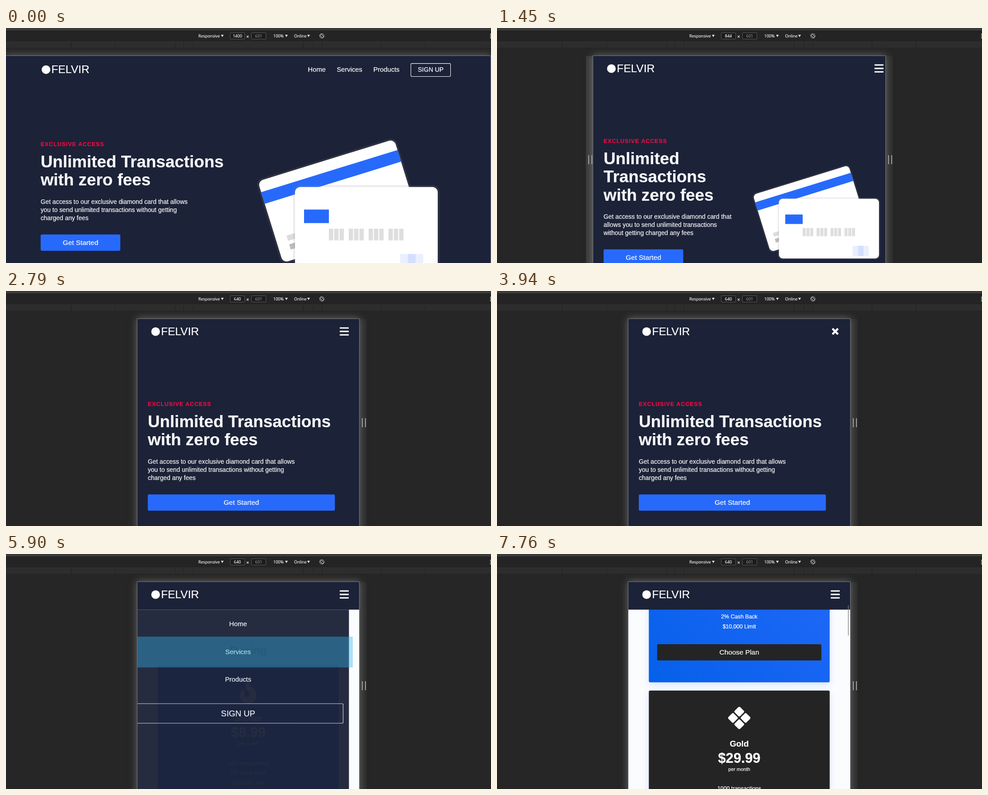
Write an HTML page that moves like this. It is 1074 by 521 pixels and loops after 8 s.

```html
<!DOCTYPE html>
<html lang="en">
<head>
<meta charset="utf-8">
<title>Responsive preview</title>
<style>
  * { box-sizing: border-box; margin: 0; padding: 0; }
  html, body { width: 100%; height: 100%; overflow: hidden; background: #262626; }
  #stage { position: relative; width: 1074px; height: 521px; overflow: hidden; background: #262626; font-family: "Liberation Sans", Arial, sans-serif; }
  #stage div, #stage svg, #stage nav { position: absolute; }

  /* Toolbar and ruler */
  #toolbar { inset: 0 0 auto; height: 31px; background: #242424; border-top: 4px solid #3a3a3a; border-bottom: 1px solid #333; font: 9px "Open Sans", "Noto Sans", sans-serif; color: #fff; -webkit-text-stroke: .15px; }
  #toolbar div { top: 14px; line-height: 14px; margin-top: -7px; white-space: nowrap; }
  #toolbar .line { inset: 0 0 auto; height: 1px; margin: 0; background: #474747; }
  #toolbar .field { top: 13px; width: 33px; height: 15px; border: 1px solid #5a5a5a; border-radius: 2px; background: #1c1c1c; text-align: center; line-height: 14px; }
  #toolbar .arrow { width: 6px; height: 5px; margin-top: -3px; background: #eee; clip-path: polygon(0 0, 100% 0, 50% 100%); }
  #ruler { inset: 31px 0 auto; height: 14px; background: #2d2d2d; border-bottom: 1px solid #222; }
  #ruler div { top: 0; width: 1px; height: 13px; background: #1f1f1f; }

  /* Device frame */
  #glow, #frame { top: 61px; height: 470px; }
  #glow { box-shadow: 0 0 16px #6a6a6a; }
  #frame { border: 1px solid #74777f; }
  .grip { top: 62px; width: 15px; height: 470px; background: rgba(255,255,255,.03); }
  .grip::after { content: ""; position: absolute; left: 5px; top: 220px; width: 5px; height: 20px; border: solid #a0a0a0; border-width: 0 2px; }
  #gripL { background: rgba(255,255,255,.09); }
  #thumb { left: 777px; width: 2px; height: 67px; border-radius: 1px; background: rgba(130,130,130,.7); }

  /* Page, in its own pixels */
  #page { top: 61.5px; height: 601px; overflow: hidden; transform-origin: 0 0; background: #1c2237; color: #f7f8fa; -webkit-text-stroke: .3px; }
  nav { inset: 0 0 auto; height: 80px; background: #1c2237; }
  #logo { display: flex; align-items: center; height: 36px; font-size: 32px; color: #fff; }
  #logo i { width: 25px; height: 25px; margin-right: 3px; border-radius: 50%; background: #fff; }
  #links { display: flex; align-items: center; gap: 32px; top: 0; height: 80px; font-size: 19.2px; white-space: nowrap; color: #fff; }
  #links span { margin-top: -3px; }
  #links b, #menu b { font-weight: 400; text-align: center; border-radius: 4px; box-shadow: inset 0 0 0 1.4px #fff; }
  #links b { width: 116px; height: 39px; line-height: 38px; font-size: 18px; }
  #icon { top: 21px; width: 30px; height: 30px; overflow: visible; stroke: #fff; fill: none; }
  #copy p:first-child { font: bold 16px/16px "Liberation Sans", Arial, sans-serif; letter-spacing: 1.4px; color: #f00946; margin-bottom: 16px; }
  #copy h1 { font-size: 48px; line-height: 52.4px; margin-bottom: 24px; }
  #copy p { max-width: 440px; font-size: 18px; line-height: 24px; margin-bottom: 35px; }
  .btn { height: 47px; line-height: 47px; font-size: 20px; text-align: center; border-radius: 4px; color: #fff; }
  #copy .btn { width: 230px; background: #276afb; }

  #shop { inset: 0; background: #fbfcfe; }
  #list { inset: 0; }
  #list .t { left: 0; right: 0; text-align: center; line-height: 1; transform: translateY(-50%); white-space: nowrap; }
  .card { left: 59px; width: 522px; height: 500px; border-radius: 4px; color: #fff; box-shadow: 0 6px 20px rgba(56,125,255,.2); }
  .card .btn { left: 24px; right: 24px; top: 390px; background: #242424; }
  .card svg { left: 229px; top: 47px; width: 64px; height: 64px; fill: #fff; }

  #menu { top: 80px; left: 0; width: 640px; height: 541px; background: #1c2237; font-size: 19.2px; text-align: center; }
  #menu span, #menu b { position: absolute; left: 16px; right: 16px; }
  #menu span { line-height: 24px; }
  #menu b { top: 271px; height: 58px; line-height: 57px; font-size: 24px; }
  #tap { left: -11px; top: 158px; width: 662px; height: 89px; background: rgba(51,181,229,.4); }
</style>
</head>
<body>
<div id="stage">
  <div id="toolbar">
    <div class="line"></div>
    <div style="left:426px">Responsive</div>
    <div class="field" style="left:496px" id="size"></div>
    <div style="left:532px;top:15px;font-size:11px">×</div>
    <div class="field" style="left:543px;color:#8c8c8c">601</div>
    <div style="left:592px">100%</div>
    <div style="left:638px">Online</div>
    <svg style="left:693px;top:7px" width="13" height="13" viewBox="-6.5 -6.5 13 13" fill="none" stroke="#ccc">
      <circle r="4.8"/><rect x="-2" y="-4.6" width="4" height="9.2" rx="1" transform="rotate(-45)"/>
    </svg>
    <div style="left:1072px;top:13px;margin:-4px 0 0;width:2px;height:10px;background:repeating-linear-gradient(#ccc 0 2px,transparent 2px 4px)"></div>
  </div>
  <div id="ruler"></div>
  <div id="glow"></div>
  <div class="grip" id="gripL"></div>
  <div class="grip" id="gripR"></div>

  <div id="page">
    <div id="copy">
      <p>EXCLUSIVE ACCESS</p>
      <h1>Unlimited Transactions with zero fees</h1>
      <p>Get access to our exclusive diamond card that allows you to send unlimited transactions without getting charged any fees</p>
      <section class="btn">Get Started</section>
    </div>
    <svg id="art" viewBox="537 235 440 320">
      <g transform="translate(557.6 338.1) rotate(-17.2)">
        <rect x="-4" y="-4" width="324" height="197" rx="15" fill="#808080" opacity=".16"/>
        <rect width="316" height="189" rx="12" fill="#fff"/>
        <path d="M0 25h316v27H0z" fill="#276afb"/>
        <path d="M25 134h150v12H25z" fill="#dcdcdc"/>
        <path d="M25 154h150v12H25z" fill="#bcbcbe"/>
      </g>
      <rect x="636" y="346.500" width="324" height="197" rx="15" fill="#808080" opacity=".16"/>
      <rect x="640" y="350.500" width="316" height="189" rx="12" fill="#fff"/>
      <path d="M660 400.500h55v30h-55z" fill="#276afb"/>
      <g id="digits" fill="#dedede"></g>
      <path d="M873 499h51v33h-51z" fill="#e9effe"/>
      <path d="M890 499h17v33h-17z" fill="#d3dffe"/>
    </svg>
    <div id="shop"><div id="list"></div></div>
    <div id="menu">
      <span style="top:30px">Home</span>
      <span style="top:110px">Services</span>
      <span style="top:190px">Products</span>
      <b>SIGN UP</b>
    </div>
    <div id="tap"></div>
    <nav>
      <div id="logo"><i></i>FELVIR</div>
      <div id="links"><span>Home</span><span>Services</span><span>Products</span><b>SIGN UP</b></div>
      <svg id="icon" viewBox="0 0 30 30"><path id="glyph"/></svg>
    </nav>
  </div>
  <div id="frame"></div>
  <div id="thumb"></div>
</div>

<script>
const LOOP = 8000, SCALE = 1074 / 1400, MID = 537;
const BARS = 'M2 5h26M2 15h26M2 25h26', CROSS = 'M7 7l16 16M23 7l-16 16';
const $ = id => document.getElementById(id);
const clamp = x => Math.max(0, Math.min(1, x));
const px = n => n + 'px';
const show = (el, on) => el.style.display = on ? '' : 'none';

function add(parent, css, text = '', cls = '') {
  const el = document.createElement('div');
  el.style.cssText = css;
  el.className = cls;
  el.textContent = text;
  parent.append(el);
  return el;
}

// Static parts
for (const x of [476, 618, 667]) add($('toolbar'), `left:${x}px`, '', 'arrow');
for (const x of [144, 242, 375, 393, 414, 658, 680, 699, 830, 928]) add($('ruler'), `left:${x}px`);
let digits = '';
for (let i = 0; i < 12; i++) {
  digits += `<rect x="${715 + Math.floor(i / 3) * 44 + i % 3 * 11.8}" y="443" width="9.600" height="26"/>`;
}
$('digits').innerHTML = digits;

const label = (box, y, size, text, bold) =>
  add(box, `top:${y}px;font-size:${size}px;font-weight:${bold ? 700 : 400}`, text, 't');

function plan(top, background, icon, name, price, features) {
  const card = add($('list'), `top:${top}px;background:${background}`, '', 'card');
  card.innerHTML = icon;
  label(card, 154, 24, name, true);
  label(card, 194.5, 40, price, true);
  label(card, 226.5, 14, 'per month');
  features.forEach((f, i) => label(card, 283 + i * 28, 16, f));
  add(card, '', 'Choose Plan', 'btn');
}

const flame = '<svg viewBox="0 0 384 512"><path d="M216 24c0-24-31-33-44-13C48 192 224 200 224 288c0 36-29 64-65 64-35 0-63-30-63-65v-85c0-22-26-33-41-17C28 213 0 261 0 320c0 106 86 192 192 192s192-86 192-192c0-170-168-193-168-296z"/></svg>';
const gem = '<svg viewBox="-32 -32 64 64"><g transform="rotate(45)">' +
  [[-24, -24], [2, -24], [-24, 2], [2, 2]].map(([x, y]) => `<rect x="${x}" y="${y}" width="22" height="22" rx="3.500"/>`).join('') +
  '</g></svg>';

const title = label($('list'), 197.5, 32, 'Pricing', true);
title.style.color = '#1c2237';
plan(240.5, 'linear-gradient(45deg,#0560ea,#276afb)', flame, 'Starter', '$8.99',
  ['100 transactions', '2% Cash Back', '$10,000 Limit']);
plan(765, '#242424', gem, 'Gold', '$29.99', ['1000 transactions']);

// Timing
const hold = (t, a, b, n) => a + Math.floor((Math.min(t, b) - a) / (b - a) * n + 1e-6) * (b - a) / n;

function ease(x) {
  x = clamp(x);
  const curve = (m, p, q) => 3 * m * (1 - m) ** 2 * p + 3 * m * m * (1 - m) * q + m ** 3;
  let a = 0, b = 1;
  for (let i = 0; i < 20; i++) {
    const m = (a + b) / 2;
    if (curve(m, .25, .25) < x) a = m; else b = m;
  }
  return curve(a, .1, 1);
}

function widthAt(t) {
  if (t < 500) return 1400;
  const i = Math.min(22, Math.floor((t - 500) / 79.09));
  return Math.round(i <= 12 ? 1400 - 556 * (i + 1) / 13 : 640 + 204 * (1 - (i - 12) / 10) ** 1.3);
}

function menuAt(t) {
  if (t < 3870 || t >= 6280) return 0;
  if (t < 5900) return ease((hold(t, 3870, 4490, 8) - 3890) / 520);
  return 1 - ease((hold(t, 5900, 6280, 5) - 5873) / 430);
}

const SCROLL = [[6980, 42], [7060, 84], [7130, 118], [7210, 138], [7450, 175], [7530, 225], [7610, 280], [7680, 320], [7760, 346]];
const scrollAt = t => SCROLL.reduce((y, [at, v]) => t >= at ? v : y, 0);

function layout(w) {
  const half = w * SCALE / 2;
  const left = Math.floor(MID - half), right = Math.ceil(MID + half);
  const edge = Math.max(0, (w - 1300) / 2), pad = w > 991 ? 50 : 30;
  const inner = Math.min(w, 1300) - 2 * pad, col = inner / 2;
  const desk = w > 960, stacked = w <= 768;

  $('size').textContent = w;
  $('page').style.cssText = `left:${left}px;width:${w}px;transform:scale(${SCALE})`;
  $('glow').style.left = $('frame').style.left = px(left - 1);
  $('glow').style.width = $('frame').style.width = px(right - left + 1);
  $('gripL').style.left = px(left - 16);
  $('gripR').style.left = px(right);

  $('logo').style.left = px(desk ? edge + pad + 3 : 40);
  $('logo').style.top = px(desk ? 21 : 18.5);
  $('links').style.right = px(edge + pad + 16);
  show($('links'), desk);
  show($('icon'), !desk);
  $('icon').style.right = px(stacked ? 28 : 4.5);

  const copy = $('copy'), art = $('art');
  const top = w > 1154 ? 248 : 239;
  copy.style.left = px(edge + pad);
  copy.style.top = px(top);
  copy.style.width = px(Math.min(540, stacked ? inner : col - 16));
  copy.lastElementChild.style.width = stacked ? '100%' : '';

  show(art, !stacked);
  const k = Math.min(1, col / 559) / SCALE;
  art.style.width = px(440 * k);
  art.style.height = px(320 * k);
  art.style.left = px(edge + pad + col + (w > 991 ? 0 : 20));
  art.style.top = px(top + copy.offsetHeight / 2 + 31 - 160 * k);
}

let shown = 0;
function draw(t) {
  const w = widthAt(t);
  if (w !== shown) layout(shown = w);
  $('gripL').style.opacity = t < 500 || t >= 2790 ? 0 : t >= 2700 ? .5 : 1;

  const open = menuAt(t), x = (open - 1) * 640;
  $('menu').style.opacity = open;
  $('menu').style.transform = `translateX(${x}px)`;
  show($('menu'), open > 0);

  const crossed = t >= 3870 && t < 5900;
  $('glyph').setAttribute('d', crossed ? CROSS : BARS);
  $('glyph').setAttribute('stroke-width', crossed ? 6 : 4);

  const tap = t < 5900 || t >= 6280 ? 0 : clamp(1 - (hold(t, 5900, 6280, 5) - 5900) / 300);
  $('tap').style.opacity = tap;
  $('tap').style.transform = `translateX(${x}px)`;

  const y = scrollAt(t);
  show($('shop'), t >= 5900);
  $('list').style.transform = `translateY(${-y / SCALE}px)`;
  show($('thumb'), y > 0);
  $('thumb').style.top = px(64 + y * .1447);
}

const begin = performance.now();
function tick() {
  draw((performance.now() - begin) % LOOP);
  requestAnimationFrame(tick);
}
tick();
</script>
</body>
</html>
```
